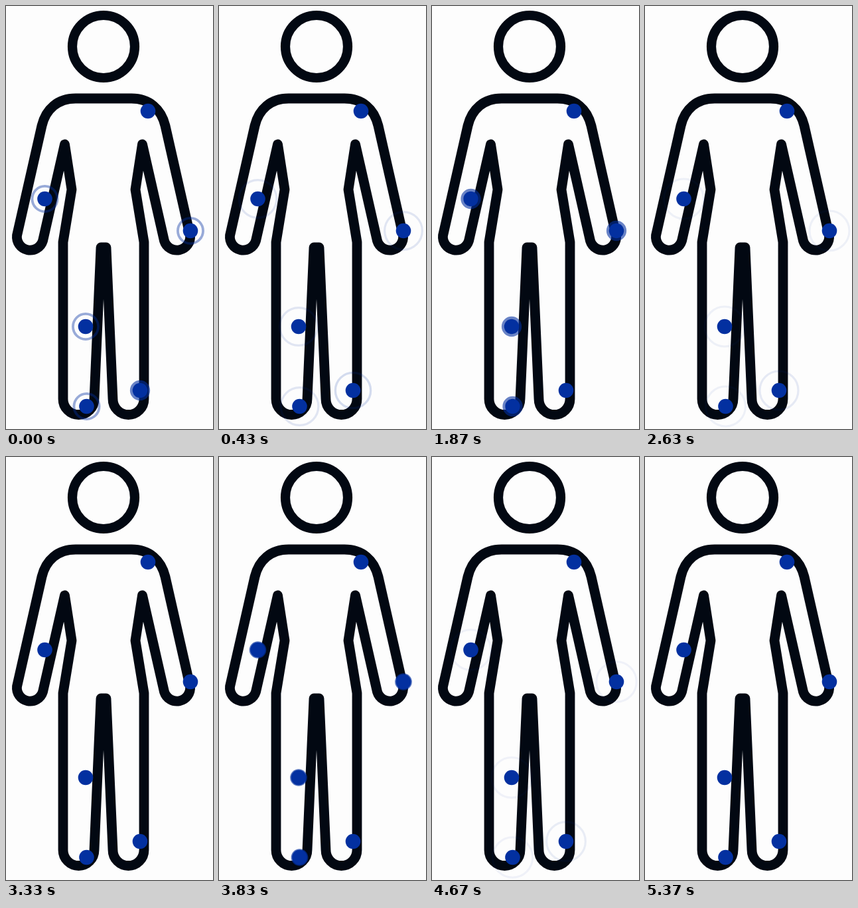
Animation, 312 px wide and 636 px high, one loop 5410 ms. Source, as an HTML page with a canvas:

```html
<!DOCTYPE html>
<html lang="en">
<head>
<meta charset="utf-8">
<title>Body pulse points</title>
<style>
html, body { margin: 0; width: 100%; height: 100%; overflow: hidden; background: #fdfdfd; }
canvas { display: block; }
</style>
</head>
<body>
<canvas id="stage" width="312" height="636"></canvas>
<script>
const ctx = document.getElementById('stage').getContext('2d');
const LOOP = 5410;
const PERIOD = 2000;
const DECAY = 340;
const REACH = 32;
const PAPER = '#fdfdfd';
const INK = '#020812';
const BLUE = '#0330a0';

// start: time at which the first pulse of the loop began; null = no pulse
const points = [
  { x: 214, y: 158, start: null },
  { x: 58.5, y: 290, start: -307 },
  { x: 278, y: 338, start: -307 },
  { x: 120, y: 482, start: -307 },
  { x: 121.5, y: 602, start: -307 },
  { x: 202, y: 578, start: -177 }
];

const body = new Path2D(
  'M105 139 H189 C216 139 234 155 240 180 L277.5 345' +
  ' A20 20 0 0 1 238.5 353 L205.5 208 L195 276 L208 355' +
  ' V591 A23.5 23.5 0 0 1 161 591 L151 363 H143 L133 591' +
  ' A23.5 23.5 0 0 1 86 591 V355 L99 276 L88.5 208 L55.5 353' +
  ' A20 20 0 0 1 16.5 345 L54 180 C60 155 78 139 105 139 Z'
);

function circle(x, y, r) {
  ctx.beginPath();
  ctx.arc(x, y, r, 0, Math.PI * 2);
}

function drawFigure() {
  ctx.strokeStyle = INK;
  ctx.lineJoin = 'round';
  ctx.lineWidth = 14.2;
  circle(147, 61, 47);
  ctx.stroke();
  ctx.lineWidth = 14.8;
  ctx.stroke(body);
}

function drawRing(p, time) {
  if (p.start === null) return;
  const age = (time - p.start) % PERIOD;
  const fade = Math.exp(-age / DECAY);
  if (fade < 0.012) return;
  ctx.globalAlpha = fade;
  ctx.strokeStyle = BLUE;
  ctx.lineWidth = 3 + 2 * fade;
  circle(p.x, p.y, REACH * (1 - fade));
  ctx.stroke();
  ctx.globalAlpha = 1;
}

function drawDot(p) {
  ctx.fillStyle = BLUE;
  circle(p.x, p.y, 11.3);
  ctx.fill();
}

function draw() {
  const time = performance.now() % LOOP;
  ctx.fillStyle = PAPER;
  ctx.fillRect(0, 0, 312, 636);
  drawFigure();
  for (const p of points) drawRing(p, time);
  points.forEach(drawDot);
  requestAnimationFrame(draw);
}

draw();
</script>
</body>
</html>
```
